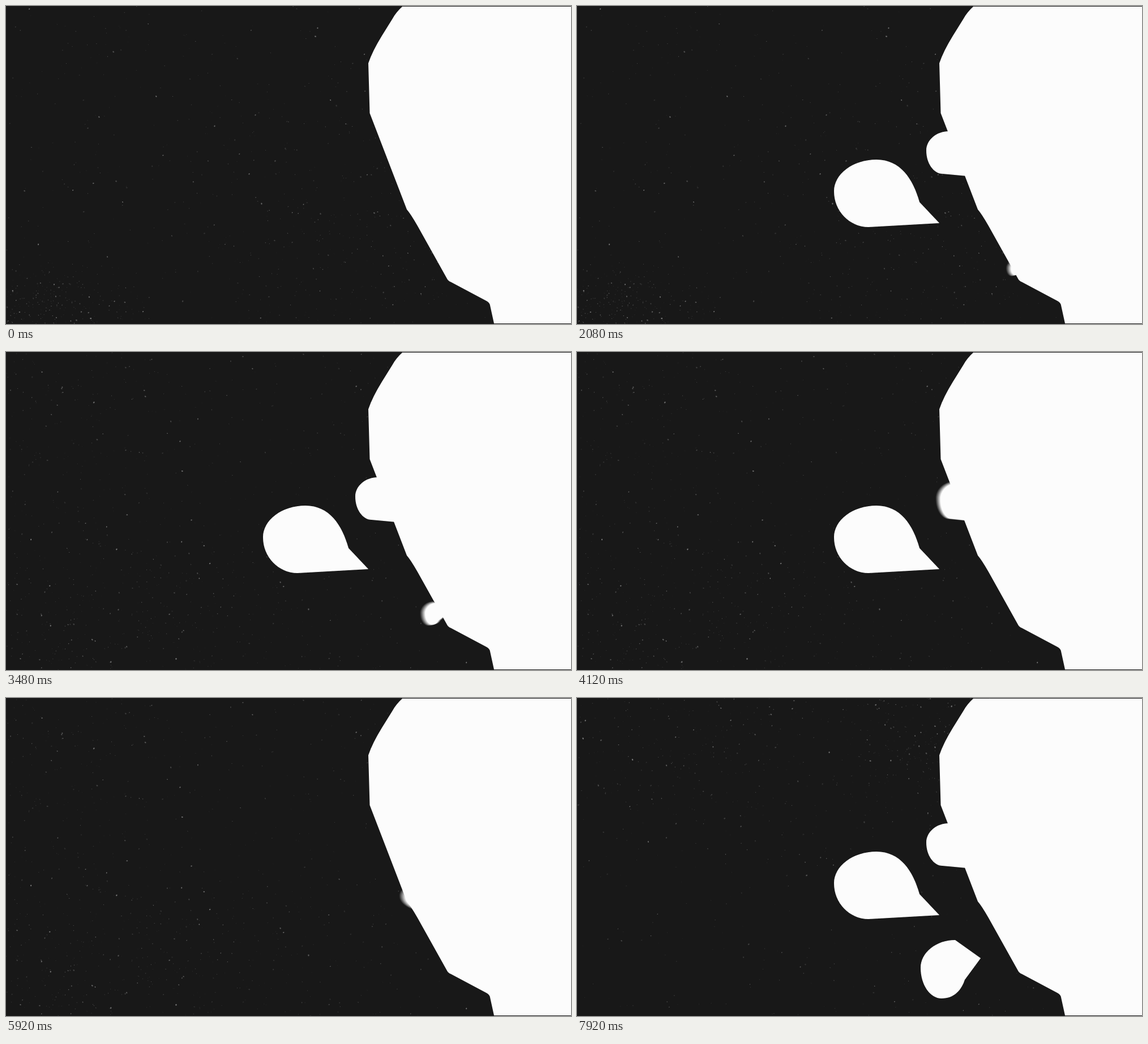
An HTML page with a canvas that plays this animation: 998 px wide and 561 px high, repeating every 8000 ms.

```html
<!DOCTYPE html>
<html lang="en">
<head>
<meta charset="utf-8">
<title>Speech drops</title>
<style>
  html, body { margin: 0; width: 100%; height: 100%; overflow: hidden; background: #181818; }
  canvas { display: block; width: 100vw; height: 100vh; }
</style>
</head>
<body>
<canvas id="stage" width="998" height="561"></canvas>
<script>
const W = 998, H = 561, LOOP = 8000, FRAME = 40;
const SHUTTER = 22, SAMPLES = 16;
const DARK = '#181818', LIGHT = '#fcfcfc';

const ctx = document.getElementById('stage').getContext('2d');
const makeLayer = () => {
  const c = document.createElement('canvas');
  c.width = W;
  c.height = H;
  return c.getContext('2d');
};
const layer = makeLayer();

const head = new Path2D(`M700,1 Q689,11 683,22 L664,52.5 Q647,80 640,101 L642.5,189 L708,359
  Q715,367 727,388 L779,481 Q781,485 786,487 L849,520.5 Q854,523 855,528 L862,560 H998 V1Z`);

const linear = p => p;
const easeOut = p => p * (2 - p);
const smooth = p => p * p * (3 - 2 * p);
const mix = (a, b, p) => a + (b - a) * p;
const mapPose = (pose, fn) =>
  Object.fromEntries(Object.entries(pose).map(([name, point]) => [name, fn(point, name)]));

// Scales a pose about the place in the head that it grows from.
const grow = (pose, root, sx, sy = sx) =>
  mapPose(pose, ([x, y]) => [mix(root[0], x, sx), mix(root[1], y, sy)]);

// Every shape is one teardrop: tip, base, far left, crown, notch, and back to the tip.
const drop = { tip: [640, 383], base: [515, 390], left: [454, 327], crown: [529, 271], notch: [605, 346] };
const dropStretched = { tip: [698, 382], base: [600, 391], left: [491, 331], crown: [546, 290], notch: [644, 337] };
const nose = { tip: [700, 301], base: [646, 296], left: [617, 255], crown: [657, 221], notch: [700, 240] };
const bubble = { tip: [713, 459], base: [668, 427], left: [607, 476], crown: [644, 530], notch: [685, 497] };
const bubbleStretched = { tip: [744, 455], base: [684, 406], left: [631, 456], crown: [664, 507], notch: [706, 486] };
const noseRoot = [700, 285];

const shapes = [
  [
    { at: 840, pose: grow(dropStretched, [871, 365], 0.45) },
    { at: 1240, pose: dropStretched, ease: linear },
    { at: 1370, pose: drop, ease: easeOut }
  ],
  [
    { at: 1410, pose: grow(nose, noseRoot, 0.3, 0.6) },
    { at: 1550, pose: nose, ease: linear },
    { at: 1700, pose: grow(nose, noseRoot, 1.4, 1.15), ease: smooth },
    { at: 1880, pose: nose, ease: smooth }
  ],
  [
    { at: 2080, pose: grow(bubbleStretched, [806, 465], 0.25) },
    { at: 2380, pose: bubbleStretched, ease: linear },
    { at: 2520, pose: bubble, ease: easeOut }
  ]
];

function poseAt(keys, u) {
  const last = keys[keys.length - 1];
  if (u >= last.at) return last.pose;
  const i = Math.max(1, keys.findIndex(k => u < k.at));
  const from = keys[i - 1], to = keys[i];
  const p = to.ease((u - from.at) / (to.at - from.at));
  return mapPose(from.pose, ([x, y], name) =>
    [mix(x, to.pose[name][0], p), mix(y, to.pose[name][1], p)]);
}

function fillPose(g, { tip, base, left, crown, notch }) {
  const round = 0.55, pinch = 0.15;
  g.beginPath();
  g.moveTo(...tip);
  g.lineTo(...base);
  g.bezierCurveTo(mix(base[0], left[0], round), base[1], left[0], mix(left[1], base[1], round), ...left);
  g.bezierCurveTo(left[0], mix(left[1], crown[1], round), mix(crown[0], left[0], round), crown[1], ...crown);
  g.bezierCurveTo(mix(crown[0], notch[0], round), crown[1],
    mix(notch[0], crown[0], pinch), mix(notch[1], crown[1], round), ...notch);
  g.closePath();
  g.fill();
}

function seeded(seed) {
  return () => {
    seed = (seed + 0x6d2b79f5) | 0;
    let x = Math.imul(seed ^ (seed >>> 15), 1 | seed);
    x = (x + Math.imul(x ^ (x >>> 7), 61 | x)) ^ x;
    return ((x ^ (x >>> 14)) >>> 0) / 4294967296;
  };
}

// Even dust over the stage, denser around each cloud.
function makeDust(seed, even, clouds) {
  const g = makeLayer(), rnd = seeded(seed);
  const bell = () => (rnd() + rnd() + rnd() - 1.5) * 2;
  const speck = (x, y) => {
    const r = 0.5 + rnd() ** 4 * 1.1;
    g.fillStyle = `rgba(205,205,205,${0.1 + rnd() ** 2 * 0.45})`;
    g.beginPath();
    g.ellipse(x, y, r, r * 0.75, rnd() * 3, 0, 7);
    g.fill();
  };
  g.fillStyle = DARK;
  g.fillRect(0, 0, W, H);
  for (let i = 0; i < even; i++) speck(rnd() * W, rnd() * H);
  for (const { x, y, rx, ry, n } of clouds)
    for (let i = 0; i < n; i++) speck(x + bell() * rx, y + bell() * ry);
  return g.canvas;
}

const dust = [
  makeDust(11, 500, [{ x: 50, y: 540, rx: 90, ry: 45, n: 480 }, { x: 600, y: 400, rx: 150, ry: 150, n: 350 }]),
  makeDust(23, 650, [{ x: 190, y: 470, rx: 190, ry: 80, n: 420 }, { x: 80, y: 130, rx: 120, ry: 130, n: 200 }]),
  makeDust(37, 450, [{ x: 170, y: 75, rx: 140, ry: 80, n: 300 }, { x: 610, y: 70, rx: 80, ry: 65, n: 350 }])
];

// Shapes come out, go back in, then come out again.
function actionTime(t) {
  if (t < 2840) return t;
  return t < 5000 ? 5620 - t : t - 5080;
}

// Averages several moments within the shutter time for motion blur.
function drawShapes(u) {
  layer.globalCompositeOperation = 'source-over';
  layer.clearRect(0, 0, W, H);
  layer.globalCompositeOperation = 'lighter';
  layer.fillStyle = `rgba(255,255,255,${1 / SAMPLES})`;
  for (const keys of shapes) {
    if (u < keys[0].at - 30) continue;
    for (let i = 0; i < SAMPLES; i++)
      fillPose(layer, poseAt(keys, u + SHUTTER * ((i + 0.5) / SAMPLES - 0.5)));
  }
  layer.globalCompositeOperation = 'source-in';
  layer.fillStyle = LIGHT;
  layer.fillRect(0, 0, W, H);
  ctx.drawImage(layer.canvas, 0, 0);
}

function draw(t) {
  const u = actionTime(t);
  const blink = u >= 2800 && u < 2840;
  ctx.drawImage(dust[t < 3320 ? 0 : t < 6280 ? 1 : 2], 0, 0);
  if (!blink) drawShapes(u);
  ctx.fillStyle = LIGHT;
  ctx.fill(head);
}

const start = performance.now();
let shown = -1;
function tick() {
  const t = Math.floor(((performance.now() - start) % LOOP) / FRAME) * FRAME;
  if (t !== shown) draw(shown = t);
  requestAnimationFrame(tick);
}
tick();
</script>
</body>
</html>
```
